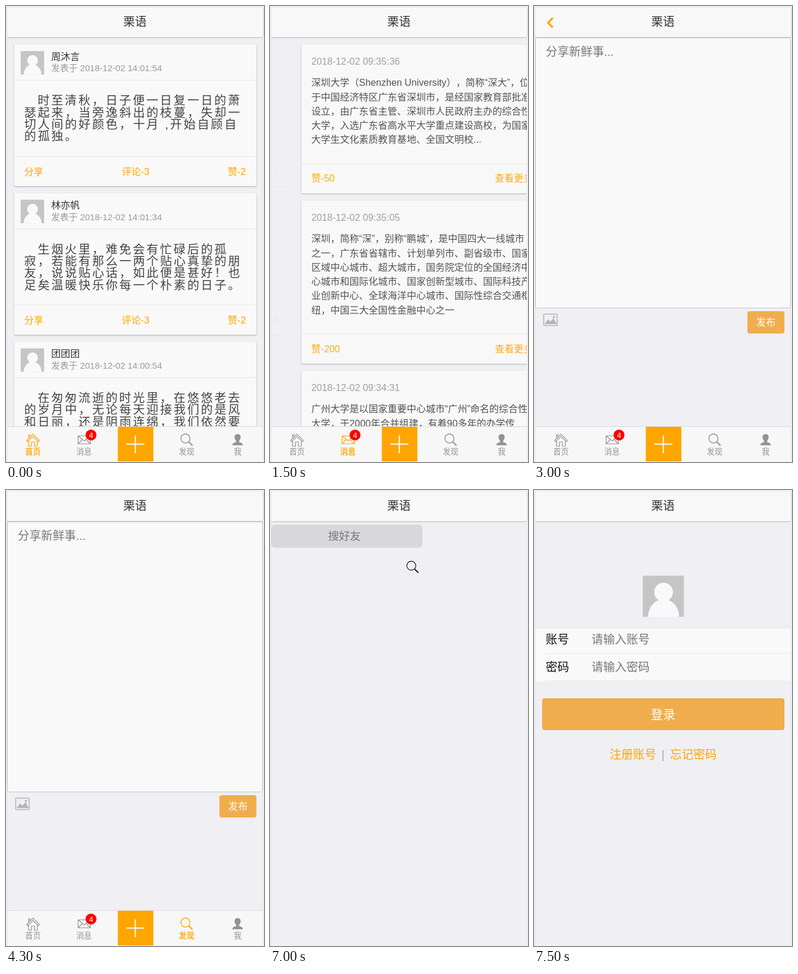
An HTML page for the animation above (8000 ms loop, 440x777 px).

```html
<!DOCTYPE html>
<html lang="zh-CN">
<head>
<meta charset="utf-8">
<style>
html, body { margin: 0; height: 100%; overflow: hidden; background: #fff; }
svg { display: block; width: 100vw; height: 100vh; }
text { font-family: "Liberation Sans", "Noto Sans CJK SC", "Noto Sans CJK", sans-serif; white-space: pre; text-spacing-trim: space-all; }
.card { fill: #f9f9f9; filter: drop-shadow(0 1px 1px rgba(0,0,0,.3)); }
.line { stroke: #e6e6e8; }
.tab { color: #929292; }
.tab.on { color: #ffa500; }
.tab.on text { stroke: currentColor; stroke-width: .35; }
.icon { fill: none; stroke: currentColor; stroke-width: 1.2; }
</style>
</head>
<body>
<svg id="stage" viewBox="0 0 440 777" preserveAspectRatio="none"></svg>
<script>
const ORANGE = '#ffa500', GREY = '#999', HINT = '#777', INK = '#444';
const stage = document.getElementById('stage');

// Text placed by the vertical centre of its line
const text = (s, x, mid, size, fill, anchor = 'start', more = '') =>
  `<text x="${x}" y="${mid + size * 0.37}" font-size="${size}" fill="${fill}" text-anchor="${anchor}" ${more}>${s}</text>`;
const rect = (x, y, w, h, fill, r = 0, more = '') =>
  `<rect x="${x}" y="${y}" width="${w}" height="${h}" rx="${r}" fill="${fill}" ${more}/>`;
const rule = (x, y, w) => `<path class="line" d="M${x} ${y}h${w}"/>`;
const card = (y, h) => `<rect class="card" x="14" y="${y}" width="413" height="${h}" rx="2"/>`;
const avatar = (x, y, size) => `<g transform="translate(${x} ${y}) scale(${size / 70})">
  ${rect(0, 0, 70, 70, '#c5c5c5')}
  <g fill="#f9f9f9"><circle cx="35.5" cy="28" r="16"/><path d="M9 70A26.5 30 0 0 1 62 70z"/></g></g>`;
const lens = (x, y, color, width) =>
  `<g fill="none" stroke="${color}" stroke-width="${width}"><circle cx="${x - 2}" cy="${y - 2}" r="7.7"/>
  <path d="M${x + 3.5} ${y + 3.5}l6.5 6.5" stroke-width="${width * 1.5}"/></g>`;

function post(i, [name, time, lines]) {
  const y = 65.3 + i * 253.3;
  return card(y, 241.7) + avatar(25, y + 11.5, 40) +
    text(name, 77, y + 20.5, 16.27, '#333') +
    text('发表于 2018-12-02 ' + time, 77, y + 40.5, 15.05, GREY) +
    rule(14, y + 61.2, 413) + rule(14, y + 191.2, 413) +
    lines.map((s, n) => text(s, n ? 31 : 54, y + 95.5 + n * 20.34, 20.34, INK, 'start',
      'letter-spacing="2.85" font-weight="300"')).join('') +
    text('分享', 31, y + 216.5, 16.27, ORANGE) +
    text('评论-3', 221, y + 216.5, 16.27, ORANGE, 'middle') +
    text('赞-2', 409, y + 216.5, 16.27, ORANGE, 'end');
}

function article(y, time, likes, lines) {
  const last = y + 65 + (lines.length - 1) * 24.25;
  return card(y, last + 92 - y) + text('2018-12-02 ' + time, 31, y + 29, 16.27, GREY) +
    lines.map((s, n) => text(s, 31, y + 65 + n * 24.25, 16.27, INK)).join('') +
    rule(14, last + 41.5, 413) +
    text('赞-' + likes, 31, last + 66, 16.27, ORANGE) +
    text('查看更多', 409, last + 66, 16.27, ORANGE, 'end');
}

const home = [
  ['周沐言', '14:01:54', ['时至清秋，日子便一日复一日的萧', '瑟起来，当旁逸斜出的枝蔓，失却一', '切人间的好颜色，十月 ,开始自顾自', '的孤独。']],
  ['林亦帆', '14:01:34', ['生烟火里，难免会有忙碌后的孤', '寂，若能有那么一两个贴心真挚的朋', '友，说说贴心话，如此便是甚好！也', '足矣温暖快乐你每一个朴素的日子。']],
  ['团团团', '14:00:54', ['在匆匆流逝的时光里，在悠悠老去', '的岁月中，无论每天迎接我们的是风', '和日丽，还是阴雨连绵，我们依然要']]
].map((p, i) => post(i, p)).join('');

const news =
  article(65.3, '09:35:36', 50, [
    '深圳大学（Shenzhen University），简称“深大”，位', '于中国经济特区广东省深圳市，是经国家教育部批准',
    '设立，由广东省主管、深圳市人民政府主办的综合性', '大学，入选广东省高水平大学重点建设高校，为国家',
    '大学生文化素质教育基地、全国文明校...']) +
  article(331.3, '09:35:05', 200, [
    '深圳，简称“深”，别称“鹏城”，是中国四大一线城市', '之一，广东省省辖市、计划单列市、副省级市、国家',
    '区域中心城市、超大城市，国务院定位的全国经济中', '心城市和国际化城市、国家创新型城市、国际科技产',
    '业创新中心、全球海洋中心城市、国际性综合交通枢', '纽，中国三大全国性金融中心之一']) +
  article(621.3, '09:34:31', 80, ['广州大学是以国家重要中心城市“广州”命名的综合性', '大学，于2000年合并组建，有着90多年的办学传']);

const compose =
  rect(2.5, 53.5, 435, 461, '#f9f9f9', 3, 'stroke="#c9c9c9"') +
  text('分享新鲜事...', 20, 78, 19.9, HINT) +
  `<g fill="none" stroke="#b5b5b5" stroke-width="1.6"><rect x="16.5" y="525" width="23" height="19.5" rx="1"/>
   <path d="M18 542l6-8 4 4 5-6 6 10z" fill="#b5b5b5" stroke="none"/><circle cx="34" cy="530" r="1.2"/></g>` +
  rect(364, 520, 63, 38, '#f0ad4e', 4) + text('发布', 395.5, 539, 16.5, '#fff', 'middle');

const search =
  rect(2, 59, 436, 39.5, '#d8d8dc', 6, 'id="field"') +
  text('搜好友', 218, 78.5, 18.7, HINT, 'middle', 'id="hint"') +
  `<g id="lens">${lens(422, 79, '#111', 1.2)}</g>`;

const login = avatar(185.5, 146, 70) +
  rect(2, 235, 437, 93, '#f9f9f9') + rule(2, 235, 437) + rule(20, 278.5, 419) + rule(20, 325.5, 419) + rule(2, 328, 437) +
  ['账号', '密码'].map((s, i) => text(s, 20, 255 + i * 47, 19.9, '#111') + text('请输入' + s, 98, 255 + i * 47, 19.9, HINT)).join('') +
  rect(14.5, 355.5, 412, 53, '#f0ad4e', 3, 'stroke="#eea236"') +
  text('登录', 220, 382.5, 21, '#fff', 'middle') +
  text('注册账号', 129, 451, 19.9, ORANGE) + text('|', 220, 451, 19.9, '#aaa', 'middle') +
  text('忘记密码', 232, 451, 19.9, ORANGE);

const tab = (name, x, icon) => `<g class="tab">${icon}${text(name, x, 759, 13.2, 'currentColor', 'middle')}</g>`;
const tabs = rect(2, 717, 437, 60, '#f7f7f8') + `<path d="M2 716.5h437" stroke="#d9d9de"/>` +
  tab('首页', 46, `<path class="icon" d="M35 740.5L46 729.5 57 740.5 55 742.5 46 733.5 37 742.5zM38.5 741.5V750h5v-7h5v7h5v-8.5M38.5 737v-6.5h2.5v4"/>`) +
  tab('消息', 133, `<path class="icon" d="M123 732.5h21v13.5h-21zl10.5 8.5 10.5-8.5M123 746l7.5-7.5M144 746l-7.5-7.5"/>`) +
  tab('发现', 308, lens(308, 739, 'currentColor', 1.4)) +
  tab('我', 395, `<path fill="currentColor" d="M395 729.5c7 0 6 8 2.5 11.5v2c3 1 6.5 2 6.5 5.5h-18c0-3.5 3.5-4.5 6.5-5.5v-2c-3.5-3.5-4.5-11.5 2.5-11.5z"/>`) +
  `<circle cx="145" cy="731" r="9.3" fill="#f00"/>` + text('4', 145, 731, 13, '#fff', 'middle') +
  `<g id="plus">${rect(190.7, 717, 60.6, 59, ORANGE)}<path d="M205 746.5h31M220.5 731.5v30.5" stroke="#fff" stroke-width="2"/></g>`;

stage.innerHTML = `<clipPath id="view"><path d="M2 53h437v724H2z"/></clipPath>` +
  rect(2, 2, 437, 775, '#efeff4') +
  `<g clip-path="url(#view)">${[home, news, compose, search, login].map(p => `<g class="page">${p}</g>`).join('')}</g>` +
  `<g id="tabs">${tabs}</g>` +
  rect(2, 2, 437, 51, '#f8f8f8', 0, 'style="filter:drop-shadow(0 1px 1.5px rgba(0,0,0,.22))"') +
  `<path d="M1.5 777V1.5H438.5V777" fill="none" stroke="#dcdcdf"/>` +
  text('栗语', 220, 27, 19.9, '#333', 'middle', 'font-weight="500"') +
  `<path id="back" d="M32 20.5l-8 8 8 8" fill="none" stroke="${ORANGE}" stroke-width="3.2"/>`;

const get = id => document.getElementById(id);
const pages = [...stage.querySelectorAll('.page')], tabItems = [...stage.querySelectorAll('.tab')];
const starts = [0, 1200, 2500, 4300, 7000], activeTab = [0, 1, -1, 2, -1];
const show = (el, on) => el.setAttribute('visibility', on ? 'visible' : 'hidden');

// cubic-bezier(.36, .66, .04, 1)
function ease(x) {
  if (x <= 0) return 0;
  if (x >= 1) return 1;
  const curve = (a, b, s) => 3 * a * s * (1 - s) ** 2 + 3 * b * s * s * (1 - s) + s ** 3;
  let lo = 0, hi = 1;
  for (let i = 0; i < 20; i++) {
    const s = (lo + hi) / 2;
    if (curve(0.36, 0.04, s) < x) lo = s; else hi = s;
  }
  return curve(0.66, 1, lo);
}

function place(page, x, opacity) {
  show(page, opacity > 0);
  page.setAttribute('transform', `translate(${x} 0)`);
  page.setAttribute('opacity', opacity);
}

function draw(now) {
  const t = Math.floor(now % 8000 / 100) * 100;
  const k = starts.filter(s => s <= t).length - 1;
  const d = t - starts[k];
  const p = k && d < 500 ? ease((d - 85) / 500) : 1;
  pages.forEach((page, i) => {
    if (i === k) place(page, 436 * (1 - p), p);
    else if (i === k - 1) place(page, -436 * p, 1 - p);
    else place(page, 0, 0);
  });
  tabItems.forEach((el, i) => el.classList.toggle('on', i === activeTab[k]));
  get('tabs').setAttribute('display', k === 4 ? 'none' : 'inline');
  show(get('plus'), !(k === 2 && d < 100));
  show(get('back'), k === 2);
  // The search row collapses while its page leaves
  const narrow = k === 4;
  get('field').setAttribute('width', narrow ? 258 : 436);
  get('hint').setAttribute('x', narrow ? 127 : 218);
  get('lens').setAttribute('transform', narrow ? 'translate(-179 52)' : '');
  requestAnimationFrame(draw);
}
draw(performance.now());
</script>
</body>
</html>
```
